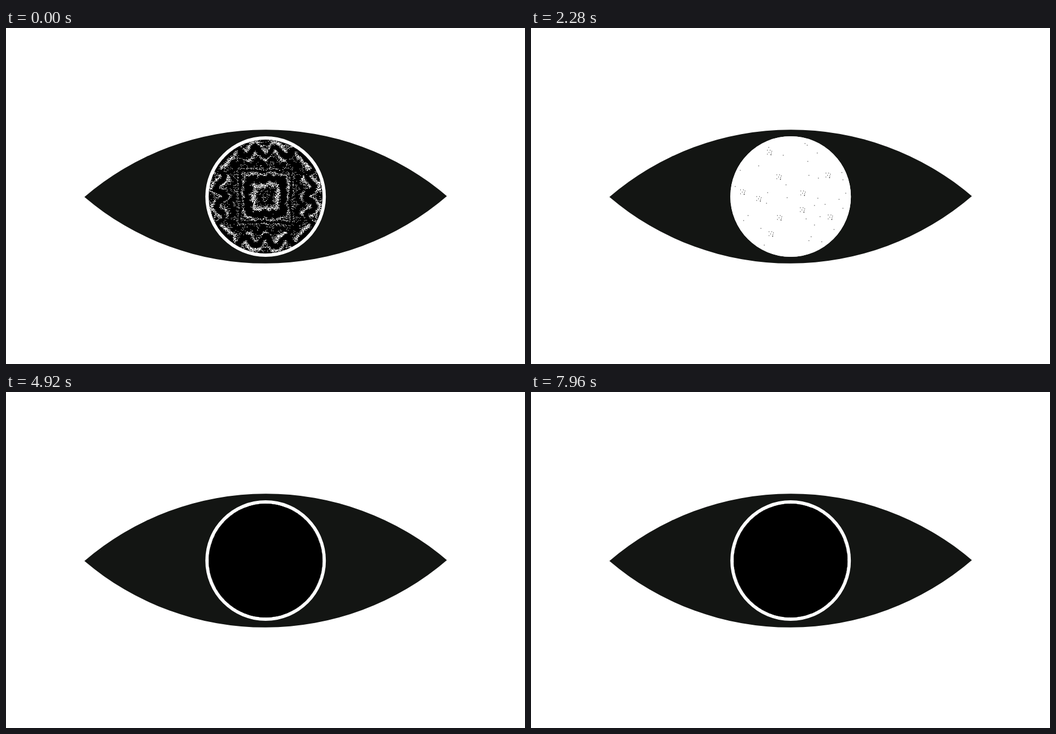
Recreate the animation shown at these times as an HTML page without scripts. Size 930 by 602 pixels, loop 8 s.

```html
<!DOCTYPE html>
<html lang="en">
<head>
<meta charset="utf-8">
<title>Eye</title>
<style>
  @property --t { syntax: "<number>"; inherits: true; initial-value: 0; }

  html, body { margin: 0; width: 100%; height: 100%; overflow: hidden; background: #fff; }
  svg { display: block; width: 930px; height: 602px; }

  /* half-width of a band: --r of its ring at the start, --o within the ring, --t travelled */
  #rings { animation: grow 8s steps(100) infinite; }
  .band { transform: scale(calc(max(.01, var(--r) + var(--o) + var(--t)) / 100)); }
  .line { fill: none; stroke-linejoin: round; stroke-linecap: round; vector-effect: non-scaling-stroke; }
  .w { stroke: #fff; }
  .k { stroke: #000; }
  #dim { animation: dim 8s linear infinite; }

  /* iris, white, iris, black: 40 ms each */
  #white { animation: white 160ms step-end infinite; }
  #black { animation: black 160ms step-end infinite; }

  @keyframes grow { to { --t: 132; } }
  @keyframes dim { 0% { opacity: .42; } 8%, 100% { opacity: 0; } }
  @keyframes white { 0%, 50%, 100% { opacity: 0; } 25% { opacity: 1; } }
  @keyframes black { 0%, 100% { opacity: 0; } 75% { opacity: 1; } }
</style>
</head>
<body>
<svg viewBox="0 0 930 602">
  <defs>
    <clipPath id="iris"><circle r="102"/></clipPath>

    <!-- wobble the rings, then turn their greys into black and white grain -->
    <filter id="grain" filterUnits="userSpaceOnUse" x="-120" y="-120" width="240" height="240" color-interpolation-filters="sRGB">
      <feTurbulence type="fractalNoise" baseFrequency=".05" numOctaves="2" seed="7" result="wobble"/>
      <feDisplacementMap in="SourceGraphic" in2="wobble" scale="11" xChannelSelector="R" yChannelSelector="G"/>
      <feGaussianBlur stdDeviation="1.2" result="tone"/>
      <feTurbulence type="fractalNoise" baseFrequency=".83" numOctaves="1" seed="3"/>
      <feColorMatrix values="0 0 0 1 0  0 0 0 1 0  0 0 0 1 0  0 0 0 0 1" result="noise"/>
      <feComposite in="tone" in2="noise" operator="arithmetic" k2=".6" k3="1" k4="-.3"/>
      <feComponentTransfer>
        <feFuncR type="discrete" tableValues="0 1"/>
        <feFuncG type="discrete" tableValues="0 1"/>
        <feFuncB type="discrete" tableValues="0 1"/>
      </feComponentTransfer>
    </filter>

    <path id="box" class="line" d="M-100-100Q0-92 100-100Q92 0 100 100Q0 92-100 100Q-92 0-100-100Z"/>
    <path id="side" class="line" d="M-99-99q11 20 22 0t22 0 22 0 22 0 22 0 22 0 22 0 22 0 22 0"/>
    <g id="scallop">
      <use href="#side"/>
      <use href="#side" transform="rotate(90)"/>
      <use href="#side" transform="rotate(180)"/>
      <use href="#side" transform="rotate(270)"/>
    </g>

    <g id="ring">
      <g class="band" style="--o:0">
        <use href="#box" class="w" stroke-width="8"/>
        <use href="#box" class="k" stroke-width="4.5"/>
      </g>
      <g class="band" style="--o:14">
        <use href="#scallop" class="k" stroke-width="5"/>
      </g>
      <g class="band" style="--o:27">
        <use href="#scallop" class="w" stroke-width="6"/>
      </g>
      <g class="band" style="--o:39">
        <use href="#scallop" class="w" stroke-width="12"/>
        <use href="#scallop" class="k" stroke-width="9" transform="scale(.95)"/>
      </g>
    </g>

    <marker id="specks" markerUnits="userSpaceOnUse" markerWidth="16" markerHeight="16" viewBox="-8 -8 16 16">
      <path class="k" stroke-width="1.1" d="M-5-4h1m4 0h1m2 2h1m-6 2h1m3 1h1m-8 2h1m5 1h2"/>
    </marker>
    <marker id="speck" markerUnits="userSpaceOnUse" markerWidth="2" markerHeight="2" viewBox="-1 -1 2 2">
      <path class="k" stroke-width="1.2" d="M-.6 0h1.2"/>
    </marker>
  </defs>

  <path d="M140.5 302.8A500 500 0 0 1 790 301.2A500 500 0 0 1 140.5 302.8Z" fill="#131513"/>

  <g transform="translate(465.2 302)">
    <circle r="108" fill="#fff"/>
    <g clip-path="url(#iris)">
      <g filter="url(#grain)">
        <rect x="-120" y="-120" width="240" height="240" fill="#7c7c7c"/>
        <g id="rings">
          <use href="#ring" style="--r:98.5"/>
          <use href="#ring" style="--r:46.5"/>
          <use href="#ring" style="--r:-5.5"/>
          <use href="#ring" style="--r:-57.5"/>
          <use href="#ring" style="--r:-109.5"/>
        </g>
        <circle r="10" fill="#7c7c7c"/>
        <rect id="dim" x="-120" y="-120" width="240" height="240"/>
      </g>
    </g>
    <circle id="black" r="102"/>
  </g>

  <g id="white">
    <circle cx="465.2" cy="302" r="108" fill="#fff"/>
    <polyline fill="none" marker-start="url(#specks)" marker-mid="url(#specks)" marker-end="url(#specks)"
      points="428,223 533,264 445,267 488,296 409,306 487,326 446,340 431,369 380,294 537,339"/>
    <polyline fill="none" marker-start="url(#speck)" marker-mid="url(#speck)" marker-end="url(#speck)"
      points="426,214 491,207 495,210 513,224 452,228 496,239 408,247 375,255 498,264 515,269 557,259 559,272 366,284 457,281 424,295 459,304 564,296 552,307 514,305 527,316 422,314 508,318 559,323 518,338 493,342 508,353 389,336 381,345 412,359 543,361 502,374 498,381 521,383 418,389"/>
  </g>
</svg>
</body>
</html>
```
